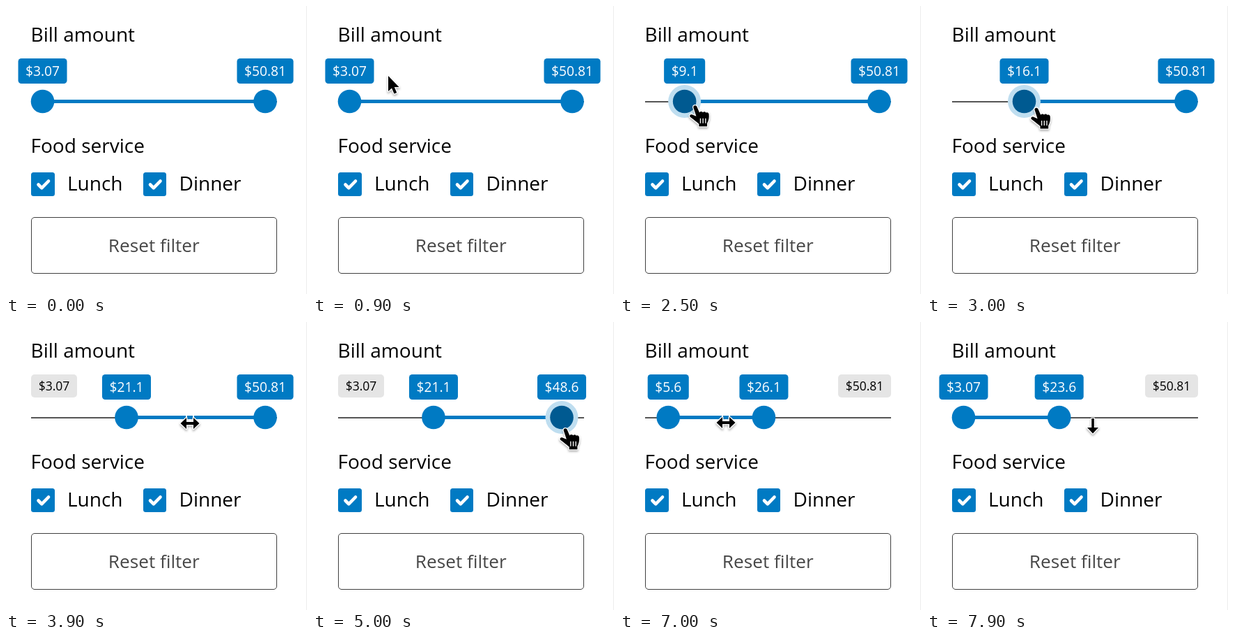
Write an HTML page that moves like this. It is 432 px wide and 412 px high and loops after 8 s.

```html
<!DOCTYPE html>
<html lang="en">
<head>
<meta charset="utf-8">
<title>Bill filter</title>
<style>
  html, body { margin: 0; width: 100%; height: 100%; overflow: hidden; background: #fff; }
  svg { display: block; width: 432px; height: 412px; }
  text { font-family: "Open Sans", "Noto Sans", sans-serif; font-size: 28px; }
  .tip text { font-size: 19.2px; fill: #fff; text-anchor: middle; }
  .limit text { font-size: 17.5px; text-anchor: middle; }
  .blue { fill: #007ac3; }
  .tick { fill: none; stroke: #fff; stroke-width: 4.6; stroke-linecap: round; stroke-linejoin: round; }
  .ink { stroke: #fff; stroke-width: 2.6; stroke-linejoin: round; paint-order: stroke; }
  #cursor { filter: drop-shadow(0 2px 1.5px rgba(0, 0, 0, .3)); }
</style>
</head>
<body>
<svg viewBox="0 0 432 412">
  <rect width="432" height="412" fill="#fff"/>
  <path d="M431.5 0V412" stroke="#ececec"/>
  <text x="35.5" y="51">Bill amount</text>
  <text x="35.5" y="210">Food service</text>
  <text x="88" y="264">Lunch</text>
  <text x="248.5" y="264">Dinner</text>

  <rect class="blue" x="36" y="238" width="34" height="34" rx="3.5"/>
  <path class="tick" d="M46.5 255.5L51.3 260.3L61 250.5"/>
  <rect class="blue" x="197" y="238" width="33" height="34" rx="3.5"/>
  <path class="tick" d="M207 255.5L211.8 260.3L221.5 250.5"/>

  <rect x="36.5" y="302.5" width="352" height="80" rx="4.5" fill="#fff" stroke="#404040"/>
  <text x="212.3" y="352" text-anchor="middle" fill="#474747" style="font-size:26.2px;font-weight:500">Reset filter</text>

  <g id="minLabel" class="limit">
    <rect x="36" y="75" width="66" height="33" rx="5" fill="#e5e5e5"/>
    <text x="69" y="98">$3.07</text>
  </g>
  <g id="maxLabel" class="limit">
    <rect x="313" y="75" width="76" height="33" rx="5" fill="#e5e5e5"/>
    <text x="351" y="98">$50.81</text>
  </g>

  <path d="M36 137H389" stroke="#555" stroke-width="2"/>
  <path id="range" stroke="#007ac3" stroke-width="5"/>
  <g id="low">
    <circle class="halo" r="23.5" cy="136.5" fill="#bfdef0"/>
    <circle class="knob" r="16.8" cy="136.5"/>
    <g class="tip"><rect class="blue" y="75" height="36" rx="4.5"/><text y="100"></text></g>
  </g>
  <g id="high">
    <circle class="halo" r="23.5" cy="136.5" fill="#bfdef0"/>
    <circle class="knob" r="16.8" cy="136.5"/>
    <g class="tip"><rect class="blue" y="75" height="36" rx="4.5"/><text y="100"></text></g>
  </g>

  <g id="cursor">
    <path id="arrow" class="ink" d="M0 0V22L5 17.5L8.5 25.5L12.2 24L8.8 16H15.5Z"/>
    <g id="hand">
      <path class="ink" d="M-1.5 2.5C-2 -.5 2 -1.5 3.4 1.2L7.2 9.8C8.5 7.8 11 8.2 12 9.6C13.5 7.8 16 8.3 16.6 10C18.5 9 20.6 10 20.8 12.5C21.2 17 20.5 21 18.2 25V29.5H6.5V26C2.5 23 -1 19.5 -5.8 16.3C-8 14.2 -5.6 11.8 -3 12.8L2.6 15.2Z"/>
      <path d="M8.6 18V25M12.3 18V25M16 18V25" stroke="#fff" stroke-width="1.3"/>
    </g>
    <g id="across">
      <path d="M-5 -11V-7M5 -11V-7" stroke="#fff" stroke-width="2"/>
      <path class="ink" d="M-13.5 0L-5 -8V-2H5V-8L13.5 0L5 8V2H-5V8Z"/>
    </g>
    <path id="down" class="ink" d="M-1.8 -10H1.8V3H8L0 11.5L-8 3H-1.8Z"/>
  </g>
</svg>
<script>
const LOOP = 8000, STEP = 100;
const MIN = 3.07, MAX = 50.81, X0 = 52.5, X1 = 372;
const SCALE = (X1 - X0) / (MAX - MIN);
const $ = id => document.getElementById(id);
const clamp = (v, a, b) => Math.min(b, Math.max(a, v));
const toX = v => X0 + (v - MIN) * SCALE;
const snap = v => clamp(MIN + Math.round((v - MIN) * 2) / 2, MIN, MAX);
const label = v => "$" + (v === MIN || v === MAX ? v : +v.toFixed(1));
const show = (el, on) => { el.style.display = on ? "" : "none"; };

// time, x, y of the pointer hotspot
const PATH = [
  [100, 345, -6], [500, 230, 50], [900, 108, 100], [1300, 78, 155],
  [1700, 66, 138], [1800, 66, 138], [2000, 67.5, 140], [2100, 67.5, 140],
  [3000, 156, 146], [3400, 188, 146], [3500, 188, 146], [3900, 264, 145],
  [4400, 335, 150], [4800, 375, 152], [5700, 313, 155], [5900, 313, 155],
  [6300, 277, 145], [6400, 277, 145], [6500, 256, 145], [7000, 152, 144],
  [7200, 134, 144], [7300, 165, 145], [7400, 96, 92], [7500, 96, 92],
  [7900, 238, 148]
];

function pointer(t) {
  let i = PATH.findIndex(p => p[0] > t);
  if (i < 0) i = PATH.length;
  const a = PATH[Math.max(0, i - 1)], b = PATH[Math.min(i, PATH.length - 1)];
  const k = b[0] > a[0] ? (t - a[0]) / (b[0] - a[0]) : 0;
  return { x: a[1] + (b[1] - a[1]) * k, y: a[2] + (b[2] - a[2]) * k };
}

// distance dragged so far, in slider units
function dragged(t, start, end) {
  return t < start ? 0 : (pointer(Math.min(t, end)).x - pointer(start).x) / SCALE;
}

function values(t) {
  let lo = t < 2200 ? MIN : snap(MIN + dragged(t, 2100, 3400));
  let hi = t < 4900 ? MAX : snap(MAX + dragged(t, 4800, 5700));
  if (t >= 6500) {
    const move = Math.max(MIN - lo, Math.round(dragged(t, 6500, 7200) * 2) / 2);
    lo = snap(lo + move);
    hi = snap(hi + move);
  }
  return { lo, hi };
}

function drawHandle(id, v, held, hover) {
  const g = $(id), x = toX(v), text = label(v);
  const width = 21 + 19.2 * (0.572 * (text.length - 1) + 0.266);
  g.setAttribute("transform", `translate(${x} 0)`);
  show(g.querySelector(".halo"), held);
  g.querySelector(".knob").setAttribute("fill", held ? "#005a91" : hover ? "#2a8ecd" : "#007ac3");
  const box = g.querySelector("rect");
  box.setAttribute("x", -width / 2);
  box.setAttribute("width", width);
  g.querySelector("text").textContent = text;
}

function draw(t) {
  const p = pointer(t), { lo, hi } = values(t);
  const a = toX(lo), b = toX(hi);
  const holdLow = t >= 2200 && t <= 3400;
  const holdHigh = t >= 4900 && t <= 5700;
  const holdRange = t >= 6500 && t <= 7200;
  const near = x => t >= 100 && !holdRange && Math.hypot(p.x - x, p.y - 136.5) < 19.5;
  const overLow = near(a), overHigh = near(b);

  drawHandle("low", lo, holdLow, overLow);
  drawHandle("high", hi, holdHigh, overHigh);
  $("range").setAttribute("d", `M${a} 136.5H${b}`);
  show($("minLabel"), a - 35 > 106);
  show($("maxLabel"), b + 35 < 311);

  const onTrack = Math.abs(p.y - 141) < 14 && p.x > 36 && p.x < 389;
  const shape = holdLow || holdHigh || overLow || overHigh ? "hand"
    : holdRange || (onTrack && p.x > a && p.x < b) ? "across"
    : onTrack ? "down" : "arrow";
  for (const id of ["arrow", "hand", "across", "down"]) show($(id), id === shape);
  show($("cursor"), t >= 100);
  $("cursor").setAttribute("transform", `translate(${p.x} ${p.y})`);
}

const begin = performance.now();
function frame() {
  const t = (performance.now() - begin) % LOOP;
  draw(Math.floor(t / STEP) * STEP);
  requestAnimationFrame(frame);
}
draw(0);
requestAnimationFrame(frame);
</script>
</body>
</html>
```
